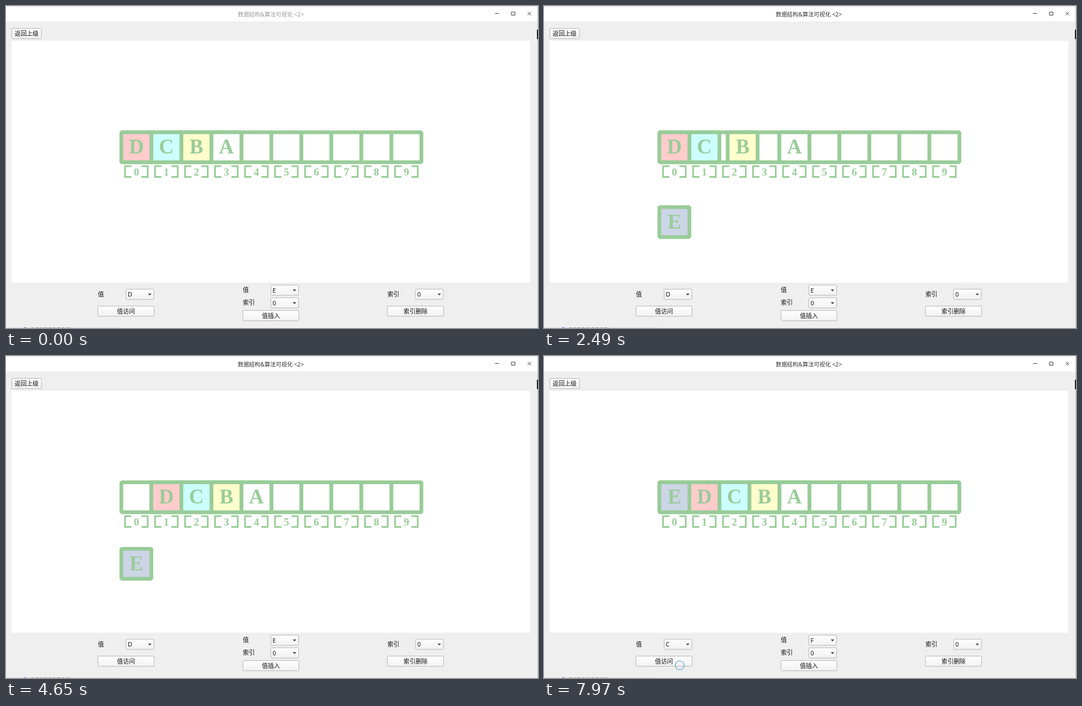
Recreate the animation shown at these times as an HTML page. Size 961 px wide and 583 px high, loop 8000 ms.

```html
<!DOCTYPE html>
<html lang="zh">
<head>
<meta charset="utf-8">
<style>
html, body { margin: 0; width: 100%; height: 100%; overflow: hidden; background: #efefef; }
svg { display: block; }
text { font: 10.84px "Noto Sans", "Noto Sans CJK SC", "Noto Sans CJK", sans-serif; fill: #111; }
.mid { text-anchor: middle; }
.title { font-size: 10.2px; }
.letter { font: bold 37px "Liberation Serif", serif; fill: #9c9; }
.digit { font: bold 19.5px "Liberation Serif", serif; fill: #9c9; }
.cell { stroke: #9c9; stroke-width: 6.7; stroke-linejoin: bevel; }
.bracket { fill: none; stroke: #9c9; stroke-width: 3; }
.widget { fill: url(#face); stroke: #b4b4b4; }
</style>
</head>
<body>
<svg id="stage" width="961" height="583" viewBox="0 0 961 583"></svg>
<script>
const LOOP = 8000, PITCH = 54.2, LEFT = 208.4, TOP = 228.6, DROP = 135.5;

const rect = (x, y, w, h, attrs) => `<rect x="${x}" y="${y}" width="${w}" height="${h}" ${attrs}/>`;
const text = (x, y, s, attrs = '') => `<text x="${x}" y="${y}" ${attrs}>${s}</text>`;
const range = (n, f) => Array.from({ length: n }, (_, i) => f(i)).join('');

const button = (x, y, w, label) =>
  rect(x, y, w, 18.5, 'rx="1.5" class="widget"') + text(x + w / 2, y + 13.2, label, 'class="mid"');
const combo = (x, y, value, id) =>
  rect(x, y, 50, 18.5, 'rx="1.5" class="widget"') + text(x + 3, y + 13.2, value, `id="${id}"`) +
  `<path d="M${x + 39.5} ${y + 8}h6.4l-3.2 3.4z" fill="#444"/>`;
const cell = (x, fill) => rect(x, TOP, PITCH, PITCH, `class="cell" fill="${fill}"`);
const index = i => {
  const x = LEFT + i * PITCH, c = x + PITCH / 2;
  return `<path class="bracket" d="M${c - 9} 290h-11.5v19.6h11.5M${c + 9} 290h11.5v19.6h-11.5"/>` +
    text(c, 307.3, i, 'class="digit mid"');
};

// Each block slides during its own span of animation steps.
const blocks = [
  { name: 'A', slot: 3, fill: '#fff', from: 0, to: 13.33 },
  { name: 'B', slot: 2, fill: '#ffc', from: 13.33, to: 26.67 },
  { name: 'C', slot: 1, fill: '#cff', from: 27, to: 39 },
  { name: 'D', slot: 0, fill: '#fcc', from: 39, to: 50.4 },
  { name: 'E', slot: 0, fill: '#ccd5e6', from: 50.4, to: 83, rises: true },
];
const block = b => {
  const x = LEFT + b.slot * PITCH;
  return `<g id="block${b.name}">` + cell(x, b.fill) +
    text(x + PITCH / 2, 267.2, b.name, 'class="letter mid"') + '</g>';
};

const ROW = 19.3;
const popup = '<g id="popup">' + rect(217, 512.5, 50.5, 90, 'fill="#fbfbfb" stroke="#aaa"') +
  rect(217.5, 513, 49.5, ROW, 'id="mark" fill="#308cc6"') +
  range(4, i => text(220, 525.7 + i * ROW, 'EDCB'[i], 'class="option"')) + '</g>';

document.getElementById('stage').innerHTML =
  `<defs><linearGradient id="face" x2="0" y2="1"><stop stop-color="#fefefe"/>
    <stop offset="1" stop-color="#f2f2f2"/></linearGradient></defs>` +
  rect(0, 0, 961, 583, 'fill="#efefef"') +
  rect(0, 0, 960, 28, 'fill="#fff"') +
  rect(0, 0, 961, 1, 'fill="#ddd"') +
  rect(960, 0, 1, 583, 'fill="#c4c4c4"') +
  rect(959, 43, 2, 17, 'fill="#222"') +
  text(478.4, 18.8, '数据结构&amp;算法可视化 &lt;2&gt;', 'id="title" class="title mid"') +
  `<path d="M883.5 13.5h7M913 11h6.5v5.5h-6.5zM942.5 10.8l6 6m0-6l-6 6" fill="none" stroke="#333"/>` +
  rect(10, 63, 937, 438, 'fill="#fff"') +
  button(10.5, 40.5, 53.5, '返回上级') +
  text(166, 525.7, '值') + combo(217, 512.7, 'D', 'visit') + button(166, 543.3, 101.5, '值访问') +
  text(427.7, 518.2, '值') + combo(478.5, 505.3, 'E', 'insert') +
  text(427.7, 541.2, '索引') + combo(478.5, 528.3, '0', 'at') + button(428, 551.3, 101, '值插入') +
  text(689, 525.7, '索引') + combo(740, 512.7, '0', 'remove') + button(689, 543.3, 101.5, '索引删除') +
  rect(0, 582, 205, 1, 'fill="#dcdcdc"') +
  rect(33, 582, 4, 1, 'fill="#55c"') +
  '<path d="M46 582.5h71" stroke="#777" stroke-dasharray="3 2 1 2"/>' +
  range(10, i => cell(LEFT + i * PITCH, '#fff')) + range(10, index) +
  blocks.map(block).join('') + popup +
  '<circle id="ring" cx="245.2" cy="560" r="8" fill="none" stroke="#4aa3d8" stroke-width="1.2"/>';

const $ = id => document.getElementById(id);
const options = document.querySelectorAll('.option');
const show = (id, on) => $(id).setAttribute('visibility', on ? 'visible' : 'hidden');

// Bursts of evenly spaced steps: first time, last time, count.
const bursts = [
  [1350, 2000, 14], [2390, 2930, 12], [3290, 4090, 17],
  [4140, 4900, 16], [4950, 5300, 8], [5580, 6330, 16],
];
const stepAt = t => bursts.reduce((sum, [first, last, n]) => {
  const k = Math.floor((t - first) / (last - first) * (n - 1) + 1.02);
  return sum + Math.max(0, Math.min(n, k));
}, 0);

function draw(t) {
  const step = stepAt(t), done = t >= 6330;
  for (const b of blocks) {
    const p = Math.max(0, Math.min(1, (step - b.from) / (b.to - b.from)));
    const [x, y] = b.rises ? [0, DROP * (1 - p)] : [PITCH * p, 0];
    $('block' + b.name).setAttribute('transform', `translate(${x} ${y})`);
  }
  show('blockE', t >= 1250);
  $('title').style.fill = t < 940 ? '#999' : '#333';
  $('visit').textContent = t >= 7770 ? 'C' : done ? 'E' : 'D';
  $('insert').textContent = done ? 'F' : 'E';

  const row = t < 7160 ? 0 : t < 7340 ? 1 : 2;
  show('popup', t >= 6830 && t < 7770);
  $('mark').setAttribute('y', 513 + row * ROW);
  options.forEach((o, i) => o.style.fill = i === row ? '#fff' : '#111');
  show('ring', t >= 7920);
}

const start = performance.now();
function tick() {
  draw((performance.now() - start) % LOOP);
  requestAnimationFrame(tick);
}
tick();
</script>
</body>
</html>
```
